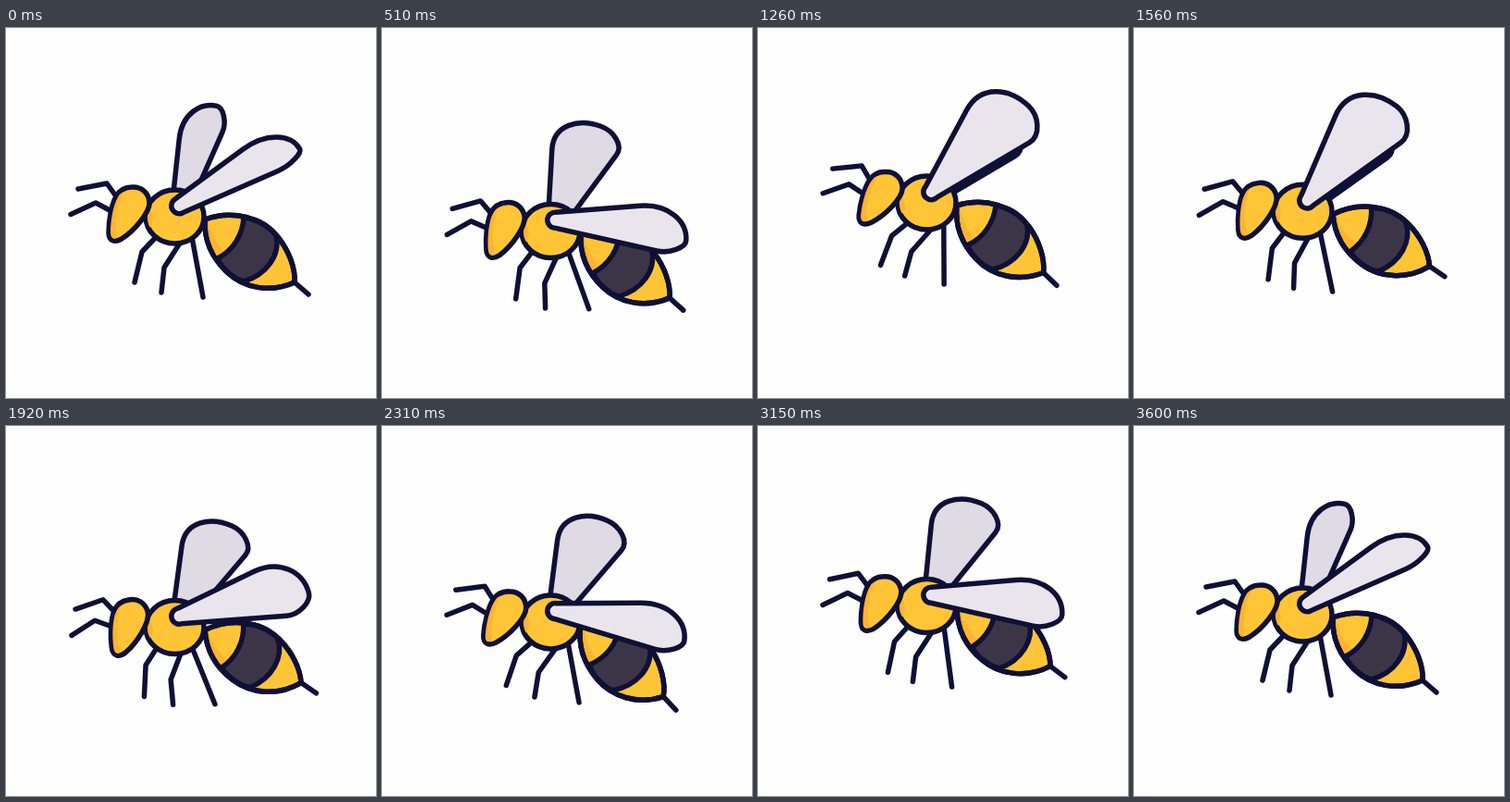
Animation, 400 px wide and 400 px high, one loop 5.63 s. Source, as an HTML page:

```html
<!DOCTYPE html>
<html lang="en">
<head>
<meta charset="utf-8">
<title>Hovering wasp</title>
<style>
  html, body { margin: 0; width: 100%; height: 100%; overflow: hidden; background: #fefefe; }
  svg { display: block; width: 100%; height: 100%; }
  .line { fill: none; }
  .shade { fill: #ffb332; stroke: none; }
</style>
</head>
<body>
<svg viewBox="0 0 400 400">
  <g id="bee" fill="#ffc536" stroke="#0f1035" stroke-width="5.500" stroke-linecap="round" stroke-linejoin="round">
    <path id="farWing" fill="#e0dae5"/>
    <path id="frontLeg" class="line" d="M165 223L147 242L139 275"/>
    <path id="midLeg" class="line" d="M187 234L171 259L168 286"/>
    <path id="hindLeg" class="line" d="M201 226L213 291"/>
    <g id="abdomen">
      <path class="line" d="M312 275L327 288"/>
      <path d="M215 207C245 196 277 205 294 226C306 241 313 260 312 275C285 287 257 281 239 264C222 248 214 228 215 207Z"/>
      <path class="shade" d="M218 209C222 222 228 235 237 243L229 248C221 236 218 222 218 209Z"/>
      <path fill="#3c3548" d="M257 205C256 223 246 240 229 249C232 258 245 271 257 274C281 267 297 246 292 224C283 213 270 206 257 205Z"/>
      <path class="line" d="M215 207C245 196 277 205 294 226C306 241 313 260 312 275C285 287 257 281 239 264C222 248 214 228 215 207Z"/>
    </g>
    <ellipse cx="182.500" cy="204" rx="31.500" ry="29"/>
    <path class="shade" d="M153 200Q152 210 156 216Q161 208 157 198Z"/>
    <g id="head">
      <path class="line" d="M78 174L109 168L119 182M70 201.500L97 189L114 198"/>
      <path d="M136 172C146 171 154 178 155 188C156 199 139 219 125 228C118 232 111 231 111 221C111 208 114 191 119 182C123 175 129 172 136 172Z"/>
      <path class="shade" d="M127 177C119 194 117 213 120 227C115 229 113 226 113 221C113 208 116 191 121 183Q123 179 127 177Z"/>
    </g>
    <path id="nearWing" fill="#eae5ec"/>
  </g>
</svg>
<script>
const LOOP = 5630, END = 3600, HALF = 780;
const el = id => document.getElementById(id);
const ease = x => (1 - Math.cos(Math.PI * x)) / 2;
const mix = (a, b, x) => a.map((v, i) => v + (b[i] - v) * ease(x));

// Eased value between [time, value] keys.
function track(t, keys) {
  const i = keys.findIndex(k => k[0] >= t);
  if (i < 1) return keys[i < 0 ? keys.length - 1 : 0][1];
  const [t0, a] = keys[i - 1], [t1, b] = keys[i];
  return a + (b - a) * ease((t - t0) / (t1 - t0));
}

// Swing that builds up from rest and settles back to it.
function swing(t, peak, amp) {
  const first = peak - HALF, last = peak + 3 * HALF;
  return track(t, [
    [0, 0],
    [first, -amp * Math.min(1, (first / 240) ** 2)],
    [peak, amp],
    [peak + HALF, -amp],
    [peak + 2 * HALF, amp],
    [last, -amp * (END - last) / 600],
    [END, 0]
  ]);
}

// Wing poses: near angle, near spread, far angle, far spread.
const REST = [-30, .11, -75, .155], UP = [-67, .32, -43, .28], DOWN = [12.8, .135, -70, .3];

function flap(t) {
  if (t < 190) return mix(REST, DOWN, t / 190);
  if (t >= 3300) return mix(UP, REST, (t - 3300) / 300);
  const p = t % 300;
  return p < 190 ? mix(UP, DOWN, p / 190) : mix(DOWN, UP, (p - 190) / 110);
}

function wing(id, y, angle, k, len) {
  const r = 8.5;
  const top = x => `${x * len} ${-r - x * len * k}`;
  const low = x => `${x * len} ${r + x * len * k}`;
  const tip = (146 - 22 * k) * len, mid = 12 * len, corner = r + 112 * len * k;
  el(id).setAttribute('d',
    `M0 ${-r}L${top(90)}C${top(121)} ${tip} ${-60 * k * len} ${tip} ${mid}` +
    `C${tip} ${mid + (corner - mid) * .55} ${low(126)} ${low(112)}L0 ${r}A${r} ${r} 0 0 1 0 ${-r}Z`);
  el(id).setAttribute('transform', `translate(187.3 ${y}) rotate(${angle})`);
}

const turn = (id, angle, x, y) => el(id).setAttribute('transform', `rotate(${angle} ${x} ${y})`);

function draw(ms) {
  const t = Math.min(END, Math.floor(ms % LOOP / 30) * 30);
  const bob = track(t, [[0, 0], [490, 15.5], [1270, -15], [2050, 15.5], [2830, -15], [END, 0]]);
  const tilt = swing(t, 1035, 8.8);
  el('bee').setAttribute('transform', `translate(0 ${bob})`);
  turn('head', tilt, 152, 200);
  turn('abdomen', swing(t, 950, 8.7), 216, 206);
  turn('frontLeg', swing(t, 1030, 12), 165, 222);
  turn('midLeg', swing(t, 1080, 12), 183, 225);
  turn('hindLeg', swing(t, 1140, 11.5), 201, 225);
  const [near, nearK, far, farK] = flap(t);
  wing('farWing', 197.5, far + tilt / 2, farK, .84);
  wing('nearWing', 192.2, near + tilt / 2, nearK, 1);
}

const start = performance.now();
function frame() {
  draw(performance.now() - start);
  requestAnimationFrame(frame);
}
frame();
</script>
</body>
</html>
```
